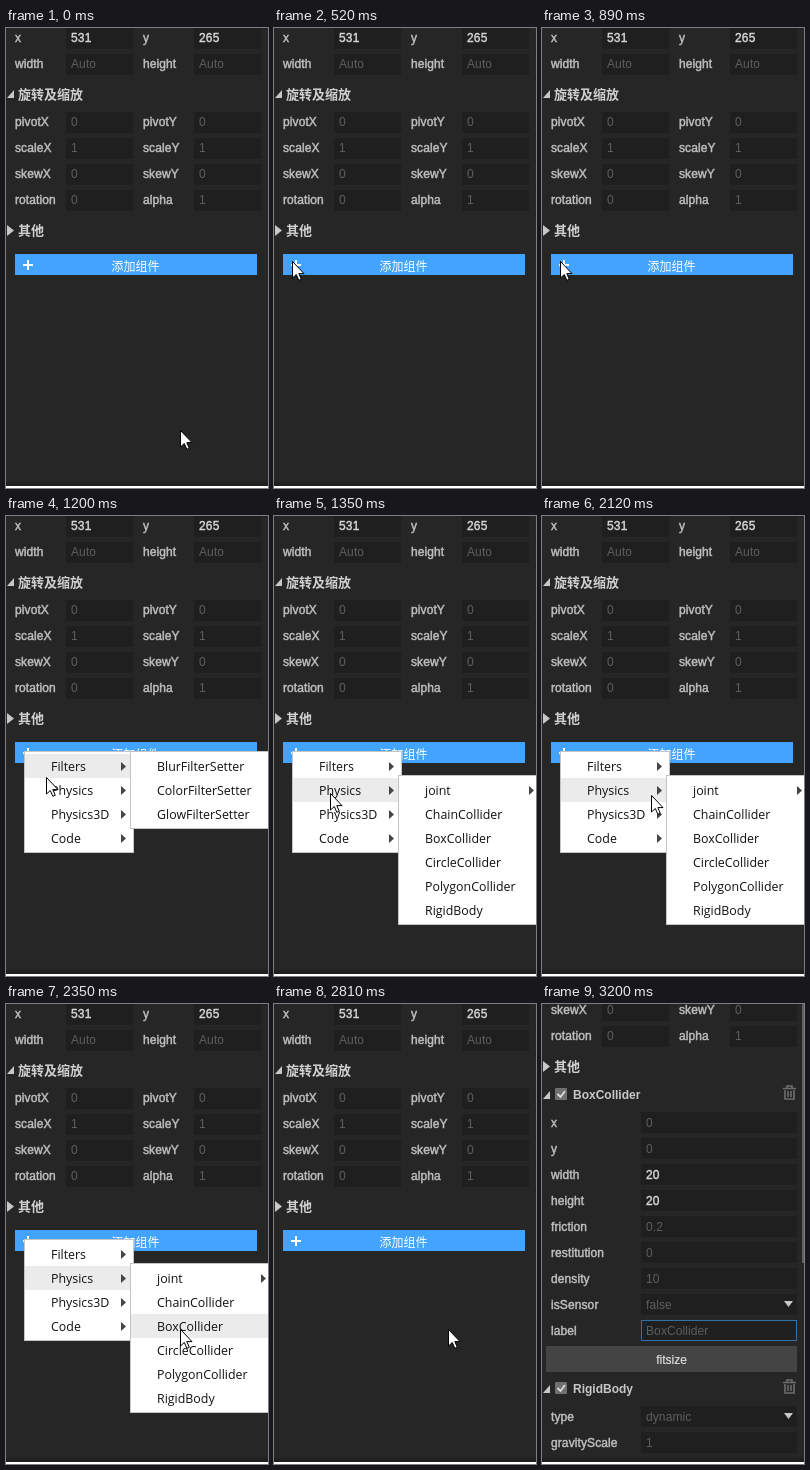
Animation of 262 by 460 pixels, one loop 4210 ms. Source, as an HTML page:

```html
<!DOCTYPE html>
<html lang="zh">
<head>
<meta charset="utf-8">
<style>
html, body { margin: 0; width: 100%; height: 100%; overflow: hidden; background: #262626; }
svg { display: block; font: 12px "Liberation Sans", Arial, sans-serif; }
text { white-space: pre; }
.label { fill: #c0c0c0; stroke: #c0c0c0; stroke-width: .45px; letter-spacing: .1px; }
.value { fill: #d8d8d8; stroke: #d8d8d8; stroke-width: .4px; letter-spacing: .2px; }
.hint { fill: #5e5e5e; letter-spacing: .1px; }
.button { fill: #dedede; stroke: #dedede; stroke-width: .2px; }
.bold { fill: #c8c8c8; font-weight: bold; }
.head { fill: #d0d0d0; font: bold 13px "Noto Sans CJK SC", "Noto Sans CJK", sans-serif; }
.add { fill: #fff; font: 12px "Noto Sans CJK SC", "Noto Sans CJK", sans-serif; }
.item { fill: #111; font: 12.4px "Open Sans", "Noto Sans", sans-serif; }
</style>
</head>
<body>
<svg id="stage" width="262" height="460" viewBox="0 0 262 460"></svg>
<script>
const LOOP = 4210, ROW = 24;
const stage = document.getElementById('stage');

const rect = (x, y, w, h, fill, extra = '') =>
  `<rect x="${x}" y="${y}" width="${w}" height="${h}" fill="${fill}" ${extra}/>`;
const text = (x, y, s, cls, extra = '') => `<text x="${x}" y="${y}" class="${cls}" ${extra}>${s}</text>`;
const path = (d, fill, extra = '') => `<path d="${d}" fill="${fill}" ${extra}/>`;
const group = (id, body) => `<g id="${id}">${body}</g>`;

// y is the vertical centre of a row
function field(x, y, name, boxX, boxW, value, filled, baseline = y + 4) {
  return text(x, baseline, name, 'label') + rect(boxX, y - 10, boxW, 21, '#1f1f1f') +
    text(boxX + 5, baseline, value, filled ? 'value' : 'hint');
}
const pair = (y, a, b, va, vb, filled) =>
  field(9, y, a, 60, 67, va, filled) + field(137, y, b, 188, 67, vb, filled);
const wide = (y, name, value, filled) => field(9, y, name, 99, 156, value, filled, y + 5);
const opened = y => path(`M8 ${y - 4}v8h-7z`, '#c8c8c8');
const dropdown = y => path(`M242 ${y - 3}h9l-4.5 6z`, '#c8c8c8');

function component(y, name) {
  return opened(y + 1) + rect(13, y - 6, 12, 12, '#707070', 'rx="1"') +
    path(`M15.5 ${y}l3 3 4.5-6`, 'none', 'stroke="#ddd" stroke-width="1.8"') +
    text(31, y + 5, name, 'bold') +
    path(`M241 ${y - 5.5}h13M245 ${y - 6}v-2h5v2M243 ${y - 4}v9h9v-9M246 ${y - 3}v6M249 ${y - 3}v6`,
      'none', 'stroke="#6e6e6e" stroke-width="1.6"');
}

function menu(id, x, y, w, items, arrows) {
  const rows = items.map((s, i) => {
    const top = y + 3 + i * ROW;
    return rect(x + 1, top, w - 2, ROW, '#ebebeb', 'class="row" visibility="hidden"') +
      text(x + 27, top + 16.5, s, 'item') +
      (i < arrows ? path(`M${x + w - 13} ${top + 8}l5 4.5-5 4.5z`, '#444') : '');
  }).join('');
  return group(id, rect(x + .5, y + .5, w - 1, items.length * ROW + 5, '#fff', 'stroke="#c4c4c4"') + rows);
}

const transform = pair(10, 'x', 'y', 531, 265, true) +
  pair(36, 'width', 'height', 'Auto', 'Auto') +
  opened(66) + text(12, 71, '旋转及缩放', 'head') +
  pair(94, 'pivotX', 'pivotY', 0, 0) + pair(120, 'scaleX', 'scaleY', 1, 1) +
  pair(146, 'skewX', 'skewY', 0, 0) + pair(172, 'rotation', 'alpha', 0, 1) +
  path('M1 197v11l7-5.5z', '#c8c8c8') + text(12, 207, '其他', 'head');

const addButton = rect(9, 226, 242, 21, '#43a4ff') +
  path('M17 237h10M22 232v10', 'none', 'stroke="#fff" stroke-width="2"') +
  text(105.5, 243, '添加组件', 'add');

const added = component(90, 'BoxCollider') +
  wide(118, 'x', 0) + wide(144, 'y', 0) +
  wide(170, 'width', 20, true) + wide(196, 'height', 20, true) +
  wide(222, 'friction', 0.2) + wide(248, 'restitution', 0) + wide(274, 'density', 10) +
  wide(300, 'isSensor', 'false') + dropdown(300) + wide(326, 'label', 'BoxCollider') +
  rect(99.5, 316.5, 155, 20, 'none', 'id="focus" stroke="#3070ac"') +
  rect(4, 342, 251, 26, '#444') + text(129.5, 359.5, 'fitsize', 'button', 'text-anchor="middle"') +
  component(384, 'RigidBody') +
  wide(412, 'type', 'dynamic') + dropdown(412) + wide(438, 'gravityScale', 1) +
  rect(260, 0, 2, 259, '#606060');

stage.innerHTML = rect(0, 0, 262, 460, '#262626') + group('panel', transform) +
  group('button', addButton) + group('added', added) +
  rect(0, 454, 262, 4, '#202020') + rect(0, 458, 262, 2, '#fff') +
  menu('main', 18, 235, 110, ['Filters', 'Physics', 'Physics3D', 'Code'], 4) +
  menu('filters', 124, 235, 144, ['BlurFilterSetter', 'ColorFilterSetter', 'GlowFilterSetter'], 0) +
  menu('physics', 124, 259, 144,
    ['joint', 'ChainCollider', 'BoxCollider', 'CircleCollider', 'PolygonCollider', 'RigidBody'], 1) +
  group('cursor', path('M.5 .5V17l3.8-3.5 2.5 5.8 2.5-1-2.5-5.7H12z', '#fff', 'stroke="#000"'));

const el = id => document.getElementById(id);
const show = (node, on) => node.setAttribute('visibility', on ? 'visible' : 'hidden');
const display = (id, on) => { el(id).style.display = on ? '' : 'none'; };
const highlight = (id, index) =>
  el(id).querySelectorAll('.row').forEach((row, i) => show(row, i === index));

// first step, last step, number of steps, end point
const moves = [
  [70, 520, 7, 18, 233],
  [1040, 1200, 3, 40, 261],
  [1280, 1350, 2, 56, 277],
  [1440, 1740, 5, 95, 277],
  [2050, 2200, 3, 136, 282],
  [2270, 2350, 2, 173.5, 324.5]
];

function pointer(t) {
  let x = 174, y = 401.5;
  for (const [start, end, steps, toX, toY] of moves) {
    if (t < start) break;
    const done = Math.min(steps, Math.floor((t - start) / (end - start) * (steps - 1)) + 1);
    x += (toX - x) * done / steps;
    y += (toY - y) * done / steps;
  }
  return [x, y];
}

function draw(t) {
  const [x, y] = pointer(t);
  const open = t >= 970 && t < 2810, built = t >= 2890;
  const pressed = t >= 680 && t < 890;
  el('button').firstChild.setAttribute('fill', pressed ? '#3692e8' : '#43a4ff');
  el('panel').setAttribute('transform', `translate(0 ${built ? -140 : 0})`);
  display('button', !built);
  display('added', built);
  display('focus', t >= 3200);
  display('main', open);
  display('filters', t >= 1120 && t < 1350);
  display('physics', open && t >= 1350);
  highlight('main', t >= 1350 ? 1 : Math.floor((y - 238) / ROW));
  highlight('physics', x > 124 ? Math.floor((y - 262) / ROW) : -1);
  display('cursor', t < 3200);
  el('cursor').setAttribute('transform', `translate(${Math.round(x)} ${Math.round(y)})`);
}

const begin = performance.now();
function tick() {
  draw((performance.now() - begin) % LOOP);
  requestAnimationFrame(tick);
}
tick();
</script>
</body>
</html>
```
